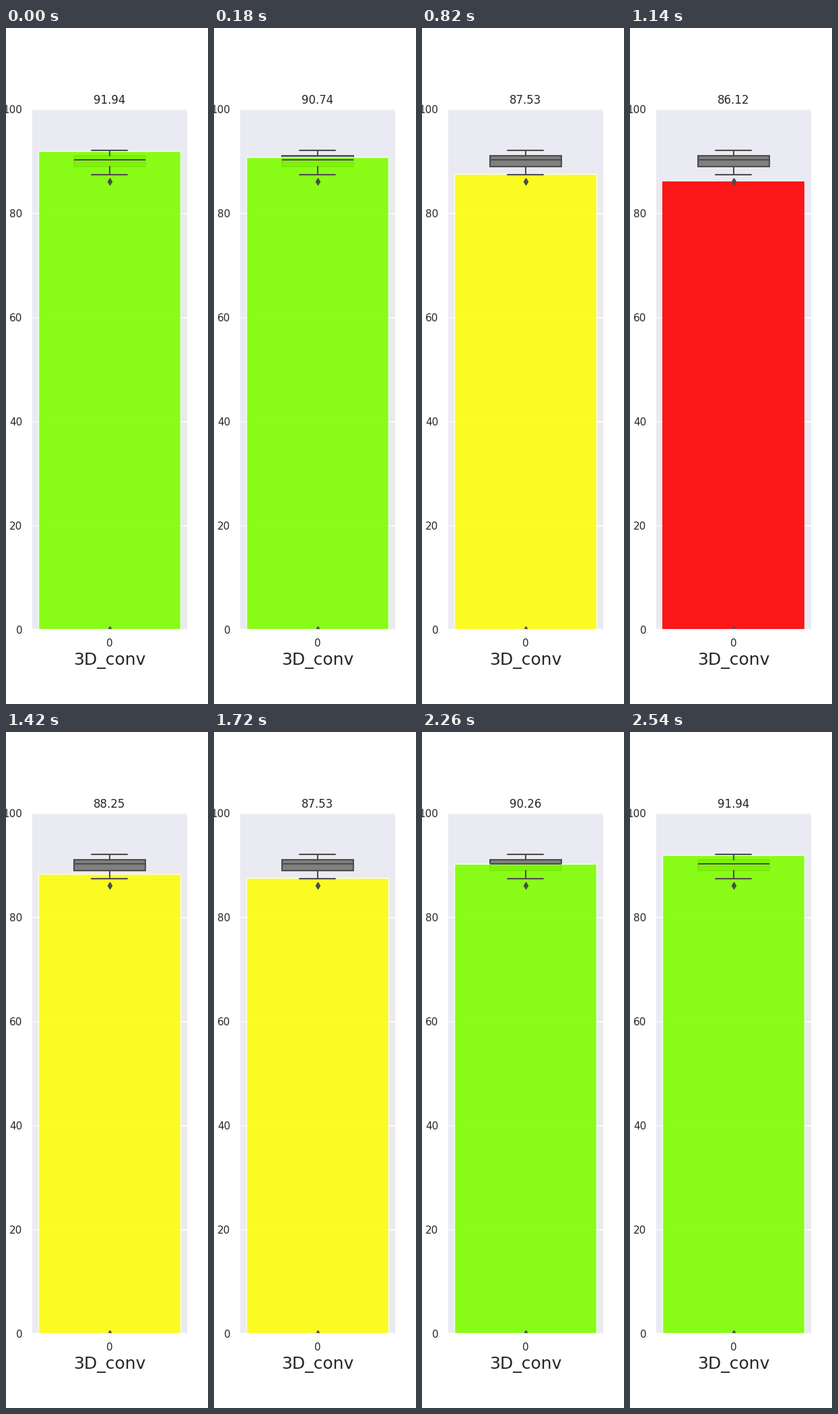
Recreate the animation shown at these times as a matplotlib script. Size 300x1000 px, loop 2.56 s.

```python
import matplotlib.pyplot as plt
import numpy as np
from matplotlib.animation import FuncAnimation

plt.rcParams.update({
    "font.family": "DejaVu Sans",
    "text.color": ".15",
    "axes.labelcolor": ".15",
    "lines.solid_capstyle": "round",
})

STEP_MS = 20
HALF = 64  # the sequence plays forwards, then backwards
INK = "#4c4c4c"

# Accuracy by the step at which it takes effect
SCORES = {
    0: 91.94, 1: 92.06, 3: 91.34, 4: 91.06, 6: 90.50, 8: 90.74, 10: 90.26,
    15: 88.85, 16: 89.78, 18: 90.86, 20: 91.22, 22: 90.62, 23: 90.14,
    24: 89.66, 26: 91.10, 31: 91.46, 33: 90.74, 35: 91.22, 36: 89.90,
    38: 89.18, 40: 88.49, 41: 87.53, 42: 89.30, 47: 90.50, 49: 91.10,
    51: 91.34, 53: 90.20, 54: 89.18, 56: 88.25, 57: 86.12, 58: 88.37,
    61: 90.20,
}
STARTS = np.array(list(SCORES))
VALUES = np.array(list(SCORES.values()))


def score_at(frame):
    step = min(frame, 2 * HALF - 1 - frame)
    return VALUES[np.searchsorted(STARTS, step, side="right") - 1]


def bar_style(score):
    """Face colour, opacity and edge width for a score."""
    if score >= 89:
        return "chartreuse", 0.9, 1
    if score >= 87:
        return "yellow", 0.85, 1
    return "red", 0.9, 0


def style_axes(ax):
    ax.set_facecolor("#EAEAF2")
    ax.set_axisbelow(True)
    ax.grid(axis="y", color="white", linewidth=1)
    for spine in ax.spines.values():
        spine.set(color="white", linewidth=1.25)
    ax.tick_params(length=0, pad=9.5, labelsize=11, labelcolor=".15")
    ax.set(xlim=(-0.44, 0.44), ylim=(0, 100))
    ax.set_xticks([0], ["0"])
    ax.set_yticks(range(0, 101, 20))
    ax.set_xlabel("3D_conv", fontsize=18)


def draw_box(ax):
    stats = dict(med=90.2, q1=88.97, q3=90.98, whislo=87.41, whishi=92.08,
                 fliers=[86.12, 0])
    line = dict(color=INK, linewidth=1.5)
    ax.bxp([stats], positions=[0], widths=0.4, patch_artist=True,
           manage_ticks=False, capprops=line, whiskerprops=line,
           medianprops=line,
           boxprops=dict(facecolor="#808080", edgecolor=INK,
                         linewidth=1.5, zorder=0.9),
           flierprops=dict(marker="d", markersize=5, linestyle="none",
                           markerfacecolor=INK, markeredgecolor=INK))


fig, ax = plt.subplots(figsize=(3, 10), dpi=100)
fig.subplots_adjust(left=0.125, right=0.9, bottom=0.11, top=0.88)
draw_box(ax)
bar = ax.bar(0, 0, width=0.8, edgecolor="white", zorder=1)[0]
style_axes(ax)
title = ax.set_title("", fontsize=12)


def update(frame):
    score = score_at(frame)
    color, alpha, edge = bar_style(score)
    bar.set(height=score, facecolor=color, alpha=alpha, linewidth=edge)
    title.set_text(f"{score:.2f}")
    return bar, title


anim = FuncAnimation(fig, update, frames=2 * HALF, interval=STEP_MS,
                     repeat=True, repeat_delay=0)
plt.show()
```
